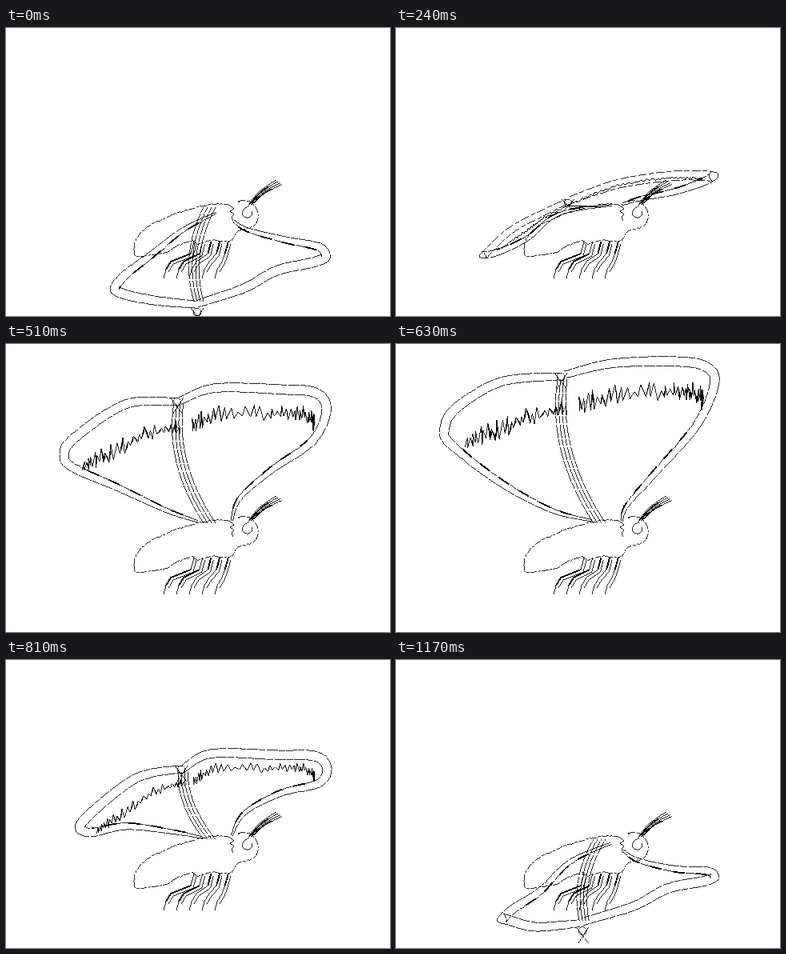
An HTML page for the animation above (1.2 s loop, 480 by 360 pixels).

```html
<!DOCTYPE html>
<html lang="en">
<head>
<meta charset="utf-8">
<title>Moth</title>
<style>
html, body { margin: 0; width: 100%; height: 100%; overflow: hidden; background: #fff; }
svg { display: block; width: 100vw; height: 100vh; }
path { fill: none; stroke: #000; stroke-width: .85; shape-rendering: crispEdges; }
.bold { stroke-width: 1.9; }
.ink { fill: #000; stroke-width: .3; }
</style>
</head>
<body>
<svg viewBox="0 0 480 360">
  <path id="body" stroke-dasharray="9 1.5 4 1"/>
  <path id="limbs"/>
  <path id="limbInk" class="bold"/>
  <path id="edge" stroke-dasharray="17 1 9 1.5"/>
  <path id="rim"/>
  <path id="accent" class="bold" stroke-dasharray="15 14"/>
  <path id="teeth"/>
  <path id="teethInk" class="ink"/>
</svg>
<script>
const LOOP = 1200, STEP = 30, HALF = LOOP / 2, TIP = 4, FINE = 10;
const $ = id => document.getElementById(id);
const set = (id, d) => $(id).setAttribute('d', d);
const pts = s => s.trim().split(/\s+/).map(p => p.split(',').map(Number));
const mix = (a, b, f) => a + (b - a) * f;
const between = (p, q, f) => [mix(p[0], q[0], f), mix(p[1], q[1], f)];
const clamp = (v, a, b) => Math.max(a, Math.min(b, v));
const rand = n => {
  const s = Math.sin(n * 127.1 + 3.7) * 43758.5453;
  return s - Math.floor(s);
};

// The stroke slows a little at both ends
const ease = t => .75 * t / HALF + .125 * (1 - Math.cos(Math.PI * t / HALF));
const KNOTS = [0, 240, 390, 570].map(ease);

// Each rim point, root to joint, passes four places: lowered, level, lifted, raised
const leftWing = [
  '262,230 270,222 245,223 245,222',
  '220,250 205,234 205,217 195,211',
  '178,281 165,266 150,212 130,178',
  '145,305 125,285 105,221 65,129',
  '130,325 104,286 87,212 55,104',
  '142,337 120,268 98,191 72,75',
  '185,346 150,244 160,143 130,42',
  '236,350 212,214 216,132 203,36'].map(pts);
const rightWing = [
  '285,240 282,222 283,220 283,222',
  '303,250 305,216 300,193 291,203',
  '350,261 350,208 345,170 325,166',
  '395,270 390,195 394,158 380,104',
  '405,288 403,184 407,135 404,48',
  '388,298 390,179 390,115 390,23',
  '340,309 345,179 340,113 350,16',
  '300,330 275,190 255,112 270,19',
  '240,349 214,212 218,133 210,34'].map(pts);

// Lagrange polynomial through the four places
function along(track, s) {
  const out = [0, 0];
  track.forEach((p, i) => {
    const w = KNOTS.reduce((m, k, j) => j === i ? m : m * (s - k) / (KNOTS[i] - k), 1);
    out[0] += w * p[0];
    out[1] += w * p[1];
  });
  return out;
}

// Catmull-Rom spline as a fine polyline
function smooth(p) {
  const out = [], at = i => p[clamp(i, 0, p.length - 1)];
  for (let n = 0; n <= (p.length - 1) * FINE; n++) {
    const i = Math.floor(n / FINE), u = n % FINE / FINE;
    out.push([0, 1].map(k => {
      const [a, b, c, d] = [-1, 0, 1, 2].map(o => at(i + o)[k]);
      return b + .5 * u * (c - a + u * (2 * a - 5 * b + 4 * c - d + u * (3 * (b - c) + d - a)));
    }));
  }
  return out;
}

const line = p => 'M' + p.map(q => q[0].toFixed(1) + ' ' + q[1].toFixed(1)).join('L');
const curve = s => line(smooth(pts(s)));

// Outline, inner outline and how far the wing turns its face to us (-1 to 1)
function wing(tracks, s) {
  const key = tracks.map(t => along(t, s));
  const area = key.reduce((sum, [x, y], i) => {
    const [x2, y2] = key[(i + 1) % key.length];
    return sum + (x * y2 - x2 * y) / 2;
  }, 0);
  const face = clamp(area / 4000, -1, 1);
  const outer = smooth(key), last = outer.length - 1;
  const inner = outer.map(([x, y], i) => {
    const a = outer[Math.max(0, i - 2)], b = outer[Math.min(last, i + 2)];
    const dx = b[0] - a[0], dy = b[1] - a[1], len = Math.hypot(dx, dy) || 1;
    const w = face * (2 + 10 * Math.sin(2.4 * i / last)) / len;
    return [x - dy * w, y + dx * w];
  });
  return { outer, inner, face, joint: outer[last] };
}

// Ragged band between the rim and the root
function ragged({ outer }, size, count, bulge) {
  const root = outer[0], rim = outer.slice(TIP * FINE), zig = [];
  let ink = '';
  for (let i = 0; i <= count; i++) {
    const v = i / count, pos = v * (rim.length - 1), k = Math.min(rim.length - 2, Math.floor(pos));
    const base = between(rim[k], rim[k + 1], pos - k);
    const [x, y] = between(base, root, .17 + .08 * v + bulge * Math.sin(Math.PI * v));
    const h = i % 2 ? .3 + .9 * rand(i + count) : -.5 * rand(i + 9);
    zig.push([x + (rand(i * 3) - .5) * size * .2, y - h * size]);
    if (i && rand(i * 5 + count) > .5) {
      const [a, b] = zig.slice(-2);
      ink += line([a, b, [mix(a[0], b[0], .6) + size * .08, mix(a[1], b[1], .5)]]) + 'Z';
    }
  }
  return [line(zig), ink];
}

function veins([x, y]) {
  let d = '';
  for (let i = 0; i < 4; i++) {
    const from = [x - 1 + 4 * i, y + 8 * Math.sign(222 - y)], to = [247 + 5 * i, 224];
    const bend = .2 * Math.abs(to[1] - from[1]);
    d += `M${from}Q${(from[0] + to[0]) / 2 - bend} ${(from[1] + to[1]) / 2} ${to}`;
  }
  return d;
}

function knot([x, y], face) {
  const r = 5, ry = r * Math.max(.4, Math.abs(face)), cx = x + 3, cy = y + ry;
  return `M${cx - r} ${cy}a${r} ${ry} 0 1 0 ${2 * r} 0a${r} ${ry} 0 1 0 ${-2 * r} 0` +
    `M${cx - 8} ${cy - ry}L${cx + 7} ${cy + 3 * ry}M${cx + 8} ${cy - ry}L${cx - 5} ${cy + 3 * ry}`;
}

function drawBody() {
  const furry = s => line(smooth(pts(s)).map(([x, y], i) =>
    [x + (rand(i) - .5) * .8, y + (rand(i + 400) - .5) * 1.6]));
  set('body',
    furry('160,276 163,263 175,250 195,239 215,231 240,224 262,220 281,221') +
    furry('160,276 163,285 180,284 200,280 215,272 232,266 240,270 258,265 280,266 290,254 304,250 313,243 315,232 309,220 300,216 290,217'));

  let thin = curve('304,222 297,227 296,234 302,237 307,234 307,229') +
    line(pts('280,222 285,226 280,229 285,233 282,236 284,241'));
  let thick = '';
  for (let i = 0; i < 5; i++) {
    const hip = 235 + 10.7 * i, foot = 197 + 16 * i;
    const leg = [[hip, 267], [hip - 4, 282], [foot + 9, 292], [foot + 3, 302], [foot, 313]];
    thin += line(leg) + line(leg.slice(0, 4).map(([x, y]) => [x + 3, y + 3]));
    thick += i < 2 ? line(leg.slice(1, 4)) : line(leg.slice(0, 2));
  }
  for (let i = 0; i < 4; i++) {
    const a = [303 + 1.5 * i, 221], b = [338 + 2.3 * i, 190 + 1.8 * i];
    const elbow = [between(a, b, .5)[0] - 3, between(a, b, .5)[1] - 2];
    const feeler = [a, elbow, b];
    thin += line(smooth(feeler));
    if (i % 2) thick += line(smooth(feeler).slice(2, 15));
  }
  set('limbs', thin);
  set('limbInk', thick);
}

function drawWings(t) {
  const s = ease(t), left = wing(leftWing, s), right = wing(rightWing, s), both = [left, right];
  const cut = TIP * FINE + 3, lines = both.flatMap(w => [w.outer, w.inner]);
  const gap = 1 - Math.min(Math.abs(left.face), Math.abs(right.face));
  set('edge', lines.map(p => line(p.slice(0, cut))).join('') +
    veins(left.joint) + knot(left.joint, left.face));
  set('rim', lines.map(p => line(p.slice(cut - 1))).join(''));
  $('rim').setAttribute('stroke-dasharray',
    `${14 - 11 * gap} ${1.5 + 6 * gap} ${8 - 6 * gap} ${1 + 4 * gap}`);
  set('accent', both.map(w => line(w.inner.slice(6, 30))).join(''));

  // The band shows only on the upper face
  const lift = 222 - left.joint[1];
  const bands = lift < 0 ? [] :
    [ragged(left, 1.5 + lift * .08, 44, .09), ragged(right, 1.5 + lift * .08, 60, .02)];
  set('teeth', bands.map(b => b[0]).join(''));
  set('teethInk', bands.map(b => b[1]).join(''));
}

function frame(now) {
  const t = Math.floor((now % LOOP) / STEP) * STEP;
  drawWings(Math.min(t, LOOP - t));
  requestAnimationFrame(frame);
}
drawBody();
drawWings(0);
requestAnimationFrame(frame);
</script>
</body>
</html>
```
